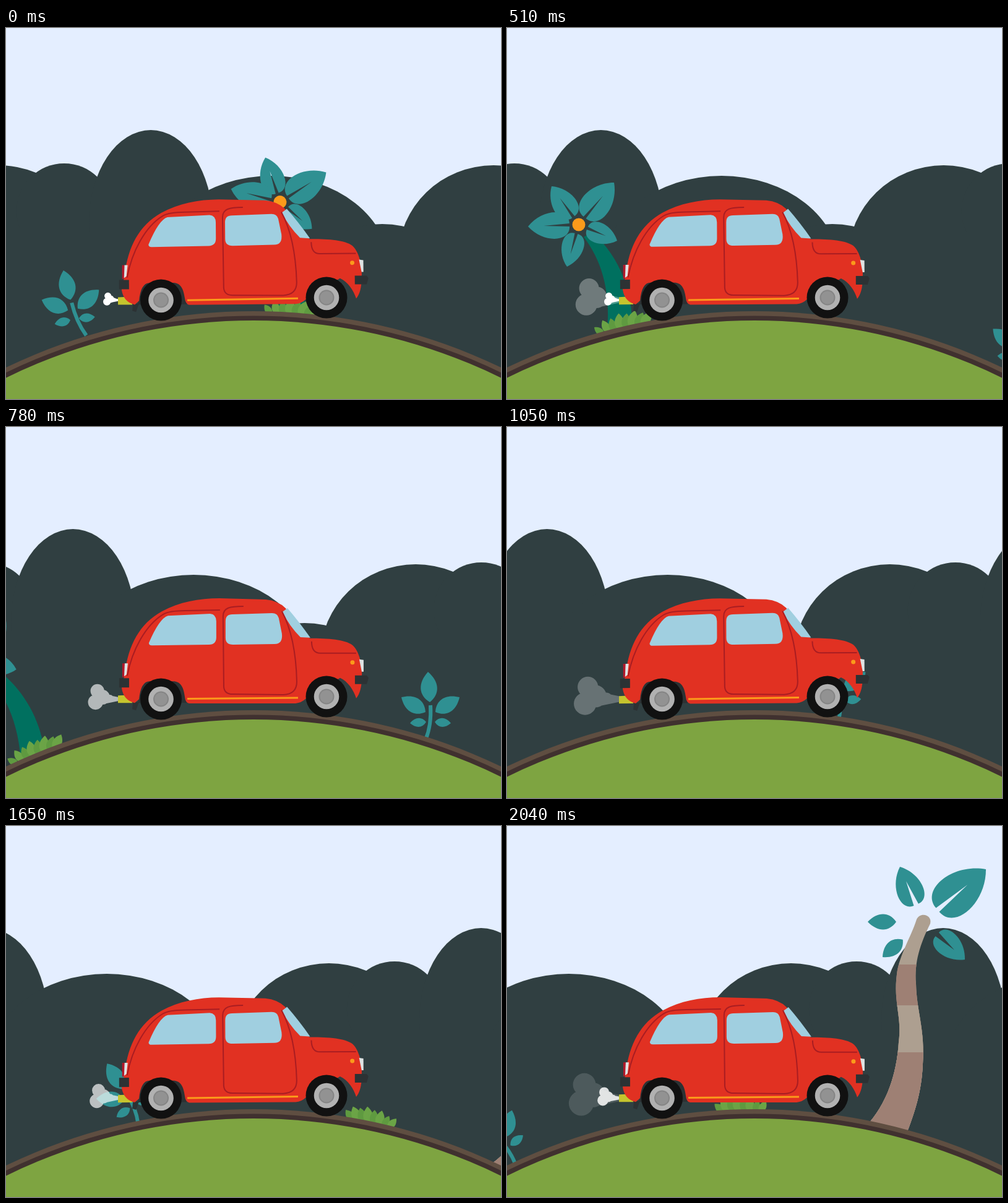
Recreate the animation shown at these times as an HTML page with a canvas. Size 800 by 600 pixels, loop 2.07 s.

```html
<!DOCTYPE html>
<html lang="en">
<head>
<meta charset="utf-8">
<title>Red car on a hill</title>
<style>
html, body { margin: 0; width: 100%; height: 100%; overflow: hidden; background: #e4eeff; }
canvas { display: block; }
</style>
</head>
<body>
<canvas id="stage" width="800" height="600"></canvas>
<script>
const ctx = document.getElementById('stage').getContext('2d');
const LOOP = 2070, STEP = 30, TAU = Math.PI * 2, RAD = Math.PI / 180;
const HUB = { x: 400, y: 1383 };      // centre of the rolling planet
const SPIN = 0.03365 * RAD;           // radians per ms
const DRIFT = 0.1613;                 // hills, px per ms
const TEAL = '#2f9092', ORANGE = '#fb9a1b', RED = '#e13122', DARK = '#2c3234',
  LINE = '#a91d22', GLASS = '#a0cfe0', PALE = '#dfe3e3';

const fill = (d, color) => { ctx.fillStyle = color; ctx.fill(new Path2D(d)); };
const stroke = (d, color, width) => {
  ctx.strokeStyle = color;
  ctx.lineWidth = width;
  ctx.stroke(new Path2D(d));
};
const oval = (x, y, rx, ry, color) => {
  ctx.fillStyle = color;
  ctx.beginPath();
  ctx.ellipse(x, y, rx, ry, 0, 0, TAU);
  ctx.fill();
};
const disc = (x, y, r, color) => oval(x, y, r, r, color);

// Turn about a point, then draw.
function turned(x, y, angle, draw) {
  ctx.save();
  ctx.translate(x, y);
  ctx.rotate(angle);
  ctx.translate(-x, -y);
  draw();
  ctx.restore();
}

// Leaf from base to tip; a notch cuts a slit into a round base.
function leaf(bx, by, tx, ty, notch = 0, color = TEAL) {
  const dx = tx - bx, dy = ty - by;
  const w = notch ? 0.42 : 0.36, low = notch ? 0 : 0.25, slit = notch / Math.hypot(dx, dy);
  const p = (a, b) => `${bx + dx * a - dy * b} ${by + dy * a + dx * b} `;
  fill(`M${p(0, slit)}C${p(low, w)}${p(0.65, w)}${p(1, 0)}` +
    `C${p(0.65, -w)}${p(low, -w)}${p(0, -slit)}L${p(0.62, 0)}Z`, color);
}

// Leaves that point away from one centre and begin at a given distance.
function crown(x, y, inner, notch, tips) {
  for (const [tx, ty] of tips) {
    const k = inner / Math.hypot(tx - x, ty - y);
    leaf(x + (tx - x) * k, y + (ty - y) * k, tx, ty, notch);
  }
}

// Fan of grass blades rooted on the road.
function tuft(x, spread) {
  const ground = px => HUB.y - Math.sqrt(925 ** 2 - (px - HUB.x) ** 2);
  for (let i = 0; i < 8; i++) {
    const u = i / 3.5 - 1, root = x + u * spread * 0.65, tip = x + u * spread;
    const height = 20 - 9 * u * u + i % 2 * 3;
    leaf(root, ground(root) + 6, tip, ground(tip) - height, 0, i % 2 ? '#6ba446' : '#5f9a40');
  }
}

function hills(t) {
  for (const shift of [-800, 0, 800]) {
    const x = shift - DRIFT * t;
    [[94, 296, 77, 77], [234, 315, 100, 150], [429, 389, 191, 150],
     [608, 481, 164, 164], [788, 372, 154, 150]]
      .forEach(([cx, cy, rx, ry]) => oval(cx + x, cy, rx, ry, '#303f41'));
  }
  ctx.fillRect(0, 330, 800, 270);
}

function sprout(root) {
  stroke(`M686 450 Q688 482 ${root} 506`, TEAL, 6);
  leaf(685, 445, 682, 396);
  for (const side of [-1, 1]) {
    leaf(686 + 8 * side, 461, 686 + 47 * side, 437);
    leaf(686 + 7 * side, 477, 686 + 33 * side, 479);
  }
}

function leaningSprout() {
  ctx.translate(-585, -5);
  turned(685, 420, -10 * RAD, () => sprout(700));
}

function flowerTree() {
  fill('M124 338 C150 372 168 420 162 490 L202 485 C204 430 184 372 138 330Z', '#00705f');
  crown(116, 318, 15, 2.5, [[72, 256], [173, 250], [34, 321], [178, 344], [97, 386]]);
  disc(116, 318, 10.5, ORANGE);
  tuft(187, 46);
}

function palm() {
  ctx.save();
  ctx.clip(new Path2D('M580 486 C614 450 630 400 633 350 C639 310 624 285 630 240 ' +
    'C634 208 652 182 662 151 C668 138 688 144 684 158 C668 190 658 220 661 255 ' +
    'C662 300 676 330 672 385 C670 430 660 460 645 500Z'));
  [140, 224, 290, 366].forEach((y, i) => {
    ctx.fillStyle = i % 2 ? '#9e8074' : '#ad9f90';
    ctx.fillRect(560, y, 140, 400);
  });
  ctx.restore();
  crown(673, 155, 30, 4, [[635, 66], [774, 70], [740, 216]]);
  crown(673, 155, 44, 0, [[583, 155], [607, 212]]);
}

function planet() {
  ['#5f4e41', '#40312f', '#7ea441'].forEach((color, i) => disc(HUB.x, HUB.y, 925 - 7.5 * i, color));
}

// One puff grows out of the pipe and fades; age in steps.
function puff(age) {
  if (age < 0 || age > 24) return;
  const size = (25 + 2.72 * age) / 49;
  ctx.save();
  ctx.translate(182, 440);
  ctx.scale(size, size);
  ctx.globalAlpha = 1 - age / 24.5;
  ctx.fillStyle = '#fff';
  ctx.beginPath();
  [[-34, -13, 11], [-37, 5, 12], [-26, -3, 12], [-14, -1, 6]].forEach(([x, y, r]) => {
    ctx.moveTo(x + r, y);
    ctx.arc(x, y, r, 0, TAU);
  });
  ctx.moveTo(0, -3);
  ctx.lineTo(0, 3);
  ctx.lineTo(-24, 8);
  ctx.lineTo(-24, -8);
  ctx.fill();
  ctx.restore();
}

function carBody() {
  fill('M214 446 V420 Q225 408 250 408 H275 Q290 412 292 446Z', DARK);
  fill('M181 434 L203 433 L204 446 H181Z', '#c5c42e');
  fill('M205 446 L215 444 L210 458 L204 456Z', DARK);
  // shell
  fill('M187 422 L192 398 C198 352 216 318 252 298 C280 283 312 277 345 277 L420 279 ' +
    'Q440 281 452 293 L491 342 C520 342 548 344 560 353 C570 361 577 385 575 405 ' +
    'Q575 428 566 439 C562 426 553 412 540 406 L484 440 Q478 446 468 447 H296 ' +
    'Q290 446 289 436 C287 420 282 411 270 411 H232 Q218 411 215 440 L208 446 ' +
    'Q190 442 187 422Z', RED);
  // windows
  fill('M231 349 Q248 309 262 305 L330 302 Q340 303 340 314 V340 Q340 352 328 352 ' +
    'L236 353 Q231 353 231 349Z', GLASS);
  fill('M355 314 Q355 303 366 303 L430 301 Q439 301 441 309 L446 334 Q448 351 434 351 ' +
    'L367 352 Q355 352 355 341Z', GLASS);
  fill('M447 299 L455 293 Q474 315 492 341 L476 340 Q458 322 447 299Z', GLASS);
  // seams
  stroke('M196 402 C204 360 226 320 254 303 Q264 297 290 297 L346 296', LINE, 2);
  stroke('M384 290 C362 290 351 292 351 306 L352 420 Q353 432 366 432 L448 433 ' +
    'Q470 432 470 412 C469 365 462 328 446 298', LINE, 2);
  stroke('M494 347 Q494 366 508 366 H566', LINE, 2);
  stroke('M293 439.5 L472 438', ORANGE, 3);
  // lamps and bumpers
  fill('M188 382 H193 L192 403 L188 405Z', '#b3182a');
  fill('M192 382 H197 L195 400 L191 403Z', PALE);
  fill('M571 376 L578 377 V396 H575Z', PALE);
  fill('M183 406 H199 V421 H183Z', DARK);
  fill('M564 402 H583 L586 406 L583 416 H564Z', DARK);
  disc(560, 381, 3.5, ORANGE);
}

function wheel(x, y) {
  disc(x, y, 33.5, '#111');
  disc(x, y, 20.3, '#b1b1b1');
  disc(x, y, 12.5, '#858585');
  disc(x, y, 10.5, '#929292');
}

function render(t) {
  const step = t / STEP;
  ctx.fillStyle = '#e4eeff';
  ctx.fillRect(0, 0, 800, 600);
  hills(t);
  // Each part is laid out as it stands at its own moment, then carried round.
  const carry = (at, draw) => turned(HUB.x, HUB.y, SPIN * (at - t), draw);
  carry(0, leaningSprout);
  carry(510, flowerTree);
  carry(780, () => sprout(678));
  carry(1650, () => tuft(590, 41));
  carry(2040, palm);
  planet();
  [0, 17, 47, 64].forEach(start => puff(step - start));
  const rattle = -0.2 - 0.25 * Math.cos(step / 6 * TAU);
  turned(385, 440, rattle * RAD, carBody);
  wheel(250.5, 440);
  wheel(518, 436);
}

const begin = performance.now();
function tick() {
  const t = (performance.now() - begin) % LOOP;
  render(Math.floor(t / STEP) * STEP);
  requestAnimationFrame(tick);
}
tick();
</script>
</body>
</html>
```
